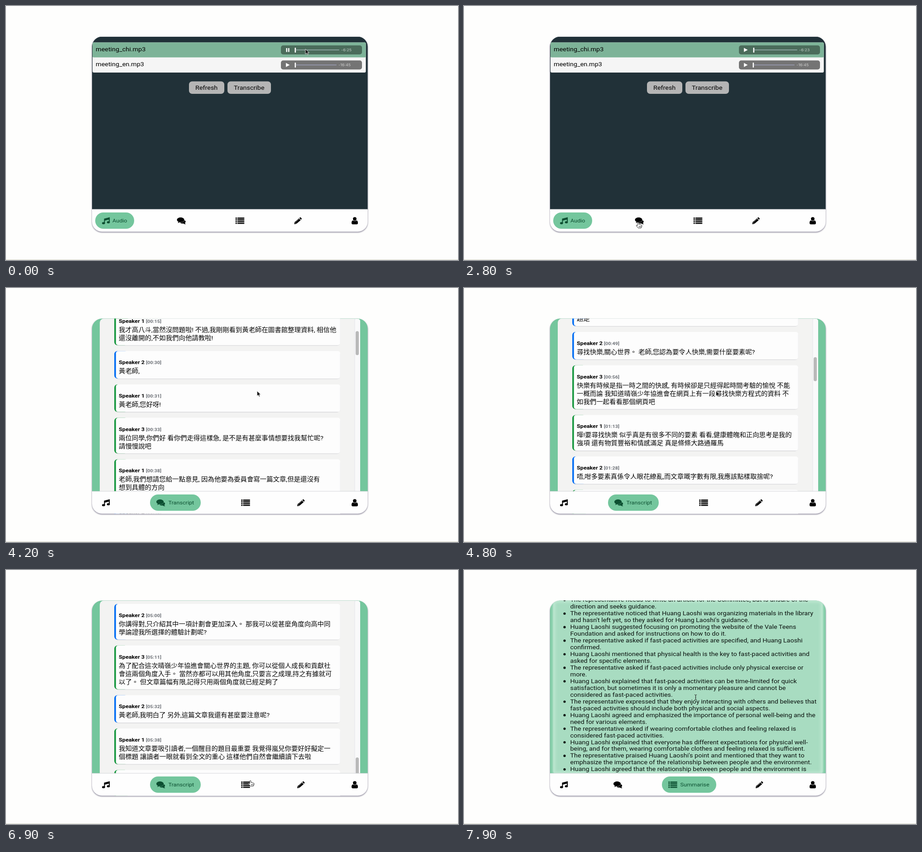
Write an HTML page that moves like this. It is 998 px wide and 561 px high and loops after 8000 ms.

```html
<!DOCTYPE html>
<html lang="zh-Hant">
<head>
<meta charset="utf-8">
<title>Meeting notes</title>
<style>
html, body { margin: 0; height: 100%; overflow: hidden; background: #fefefd; }
svg { display: block; width: 100vw; height: 100vh; }
text { font-family: Roboto, "Noto Sans CJK TC", "Noto Sans CJK", sans-serif; white-space: pre; }
.time { font-family: Inter, sans-serif; fill: #fff; opacity: .65; }
</style>
</head>
<body>
<svg id="stage" viewBox="0 0 998 561"></svg>
<script>
const LOOP = 8000, STEP = 100;
const GREEN = '#74c69d', DEEP = '#0c4f31';

const transcript = `1|00:00|恭喜你當選晴嶺少年協進會的學生代表呀! 身為你的朋友,我也覺得很光榮呀!
2|00:06|柏言,多謝你的祝賀! 但我要為委員會寫一篇文章, 現在還沒有具體方向,你不如/幫我想想呀!
1|00:15|我才高八斗,當然沒問題啦! 不過,我剛剛看到黃老師在圖書館整理資料, 相信他/還沒離開的,不如我們向他請教啦!
2|00:30|黃老師,
1|00:31|黃老師,您好呀!
3|00:33|兩位同學,你們好 看你們走得這樣急, 是不是有甚麼事情想要找我幫忙呢?/請慢慢說吧
1|00:38|老師,我們想請您給一點意見, 因為他要為委員會寫一篇文章,但是還沒有/想到具體的方向
2|00:43|是呀,老師 這篇文章是寫給高中同學看的, 委員會希望我們介紹今年的主題, 主/題是
2|00:49|尋找快樂,關心世界。 老師,您認為要令人快樂,需要什麼要素呢?
3|00:56|快樂有時候是指一時之間的快感, 有時候卻是只經得起時間考驗的愉悅 不能/一概而論 我知道晴嶺少年協進會在網頁上有一段尋找快樂方程式的資料 不/如我們一起看看那個網頁吧
1|01:13|嘩!要尋找快樂 似乎真是有很多不同的要素 看看,健康體魄和正向思考是我的/強項 還有物質豐裕和情感滿足 真是條條大路通羅馬
2|01:28|唔,咁多要素真係令人眼花繚亂,而文章嘅字數有限,我應該點樣取捨呢?
3|01:36|文章的篇幅有限,你可以先選擇兩個要素, 再仔細說明它們和快樂的關係,這/樣讀者就更容易明白
1|01:48|我認為健康體魄最重要! 每天做運動出一身汗, 所有煩惱都會一掃而空,心情/自然會好起來
2|02:00|運動的確可以令人開心, 但是有些同學不太喜歡運動,他們也可以用其他方法/找到快樂
3|02:11|說得對,每個人對快樂都有不同的看法, 所以你要想一想哪些要素最能夠引起/讀者的共鳴
1|02:23|那麼物質豐裕又怎樣呢? 有舒適的衣服和好吃的東西, 我已經覺得非常滿足和/快樂了
3|02:34|物質能夠帶來一時的滿足, 但是這種感覺很快就會消失,未必能夠成為長久的/快樂
2|02:45|這樣說來,正向思考比較適合高中同學, 因為遇到困難的時候,他們可以換一個/角度去想
1|02:54|我同意,不過和朋友相處的時間也很重要, 大家互相支持和鼓勵,比一個人獨處/開心得多
2|03:04|對呀,和家人朋友建立良好的關係, 可以得到情感上的滿足,我想把這一點寫進/文章裏面
3|03:15|嵐兒,您明白到人際互動的重要性, 這的確會令您更容易找到快樂。
2|03:22|多謝黃老師的提點,我知道這篇文章應該選擇的兩個要素了。 而晴領少年協/進會有一系列體驗尋找快樂的活動, 其中兩個活動與我的選擇直接相關。
3|03:36|這樣你可以以相關的活動內容為例, 讓人更容易明白這兩個要素,如何能夠令/人快樂, 這樣就能夠讓你的解說更具體生動了。
1|03:48|好啦,快樂就講到呢度啦,主題裏面仲有另一部份。 藍兒,你唔好淨係顧住自己/快樂,都要關心世界呀。
2|03:58|所謂獨樂樂不如眾樂樂,我當然都希望快樂唔限於個人,
3|04:05|關心世界可以由身邊的小事做起, 例如參加義工服務,探訪長者和幫助有需要/的人
1|04:16|我看到網頁上面有幾個體驗計劃, 有的是到不同地方交流,有的是服務社區, 還/有的是保護環境 每一個計劃都很有意思, 真想全部都參加呀/你會怎樣選擇呢?
2|04:30|我也覺得每一個計劃都很吸引, 不過文章的字數有限,如果全部都介紹的話,就/沒有辦法說得仔細
3|04:40|不如你只選擇其中一項計劃, 把它的目的和內容清楚地介紹給讀者, 再說明參/加者可以得到甚麼收穫, 這樣文章的重點就會更加清晰/也更有說服力
1|04:51|老師說得真有道理! 集中介紹一項計劃, 讀者看完之後就會留下深刻的印象,也/更想參加
2|05:00|你講得對,只介紹其中一項計劃會更加深入。 那我可以從甚麼角度向高中同/學論證我所選擇的體驗計劃呢?
3|05:11|為了配合這次晴嶺少年協進會關心世界的主題, 你可以從個人成長和貢獻社/會這兩個角度入手。 當然亦都可以用其他角度,只要言之成理,持之有據就可/以了。 但文章篇幅有限,記得只用兩個角度就已經足夠了
2|05:32|黃老師,我明白了 另外,這篇文章我還有甚麼要注意呢?
1|05:38|我知道文章要吸引讀者,一個醒目的題目最重要 我覺得嵐兒你要好好擬定一/個標題 讓讀者一眼就看到全文的重心 這樣他們自然會繼續讀下去啦
3|05:50|說得好,題目要簡潔有力`;

const summary = `The student was congratulated by a friend on being elected as the/student representative.
The friend offered to help and proposed asking a teacher for/some useful ideas.
The representative needs to write an article for the Committee, but is unsure of the/direction and seeks guidance.
The representative noticed that Huang Laoshi was organizing materials in the library/and hasn't left yet, so they asked for Huang Laoshi's guidance.
Huang Laoshi suggested focusing on promoting the website of the Vale Teens/Foundation and asked for instructions on how to do it.
The representative asked if fast-paced activities are specified, and Huang Laoshi/confirmed.
Huang Laoshi mentioned that physical health is the key to fast-paced activities and/asked for specific elements.
The representative asked if fast-paced activities include only physical exercise or/more.
Huang Laoshi explained that fast-paced activities can be time-limited for quick/satisfaction, but sometimes it is only a momentary pleasure and cannot be/considered as fast-paced activities.
The representative expressed that they enjoy interacting with others and believes that/fast-paced activities should include both physical and social aspects.
Huang Laoshi agreed and emphasized the importance of personal well-being and the/need for various elements.
The representative asked if wearing comfortable clothes and feeling relaxed is/considered fast-paced activities.
Huang Laoshi explained that everyone has different expectations for physical well-/being, and for them, wearing comfortable clothes and feeling relaxed is sufficient.
The representative praised Huang Laoshi's point and mentioned that they want to/emphasize the importance of the relationship between people and the environment.
Huang Laoshi agreed that the relationship between people and the environment is`;

// The whole window is slightly wider than tall, text included.
const text = (s, x, y, size = 13.1, attrs = '') =>
  `<text transform="translate(${x} ${y}) scale(1.1 1)" font-size="${size}" ${attrs}>${s}</text>`;
const rect = (x, y, w, h, fill, r = 0, attrs = '') =>
  `<rect x="${x}" y="${y}" width="${w}" height="${h}" rx="${r}" fill="${fill}" ${attrs}/>`;
const path = (d, attrs = '') => `<path d="${d}" ${attrs}/>`;

const icons = [
  path('M-4-4.6 8.6-7.7V3.4H6.6V-2.6L-2 -.4V5.6H-4Z') +
    '<ellipse cx="-5.2" cy="5.4" rx="3.3" ry="2.4"/><ellipse cx="5.5" cy="3.4" rx="3.3" ry="2.4"/>',
  path('M3-1.5C9-2 11 2.5 7.5 5Q8 7 9.8 7.8 6.5 8 4.5 6.2 0 6.6-3 4.6Z') +
    path('M-2-7.4C3-7.4 6.2-4.8 6.2-2S3 3.4-2 3.4Q-3 3.4-4 3.2-6 5-8.6 5-7 4-6.7 2.2-10 .8-10-2C-10-4.8-7-7.4-2-7.4Z',
      'stroke="var(--back)" stroke-width="1" paint-order="stroke"'),
  [-7, -3.2, .6, 4.4].map(y => path(`M-9.7 ${y}h3v2.6h-3ZM-5.5 ${y}H9.7v2.6H-5.5Z`)).join(''),
  path('M-8 7.6-7.2 3 2.2-5.2 6.2-1.4-3.2 6.8ZM3.2-6 4.6-7.3Q5.4-8 6.3-7.2L8.1-5.4Q8.8-4.6 8.1-3.8L7-2.3Z') +
    path('M-6.3 3.6-3.6 6M-5 2.2 2.6-4.2', 'stroke="var(--back)" stroke-width=".7"'),
  '<ellipse cy="-4" rx="3.9" ry="4.1"/>' +
    path('M-7 5C-7 1-5.6-.6-3.7-.6-1.6 1 1.6 1 3.7-.6 5.6-.6 7 1 7 5 7 7 6 8 4.5 8H-4.5C-6 8-7 7-7 5Z')
];
const tabs = [
  { label: 'Audio', pill: [197, 86], textX: 235, xs: [220.5, 387.5, 516.5, 644.5, 770] },
  { label: 'Transcript', pill: [318, 112], textX: 358.5, xs: [220.5, 342, 529, 651, 770] },
  { label: 'Summarise', pill: [437, 120], textX: 477.5, xs: [220.5, 340, 461, 652, 770] }
];
const navBar = (tab, active) =>
  rect(190, 449, 609, 50, '#fefefe') + rect(190, 448.6, 609, .8, '#c9cbd0') +
  rect(tab.pill[0], 456, tab.pill[1], 36, GREEN, 18) +
  tab.xs.map((x, i) => `<g transform="translate(${x} 474.3)" fill="${i === active ? DEEP : '#000'}"
    style="--back:${i === active ? GREEN : '#fefefe'}">${icons[i]}</g>`).join('') +
  text(tab.label, tab.textX, 478, 11.5, `fill="${DEEP}"`);

const player = (y, fill, track, trackEnd) =>
  rect(607, y - 10, 179, 20, fill, 5) + rect(640, y - 1, trackEnd - 640, 2, track, 1);
const playIcon = y => path(`M618 ${y - 4.5} 626.5 ${y} 618 ${y + 4.5}Z`, 'fill="#fff"');
const button = (label, x, w) =>
  rect(x, 166.5, w, 27.5, '#b5b5b5', 7) + text(label, x + 14, 184.8);

const audioPage = rect(190, 68, 609, 382, '#213138') +
  rect(191, 80.5, 603.5, 66.5, '#f5f5f5', 3) + rect(191, 80.5, 603.5, 33, '#7db398', 2) +
  text('meeting_chi.mp3', 198, 99.6) + text('meeting_en.mp3', 198, 132.6) +
  player(97, '#4b6c5b', '#87a09b', 736) + player(130.3, '#747474', '#9395a8', 730) +
  `<g id="pause">${rect(618.5, 93, 2.6, 8.5, '#fff')}${rect(623, 93, 2.6, 8.5, '#fff')}</g>
   <g id="play">${playIcon(97)}</g>` + playIcon(130.3) +
  rect(637.5, 92, 2.6, 11, '#fff', 1, 'id="knob"') + rect(637.5, 125, 2.6, 11, '#fff', 1) +
  text('-6:25', 740, 100.2, 8.2, 'class="time" id="clock"') +
  text('-16:45', 734, 133.4, 8.2, 'class="time"') +
  button('Refresh', 404, 78) + button('Transcribe', 489, 96);

const cardTop = {};
let nextTop = 87;
const cards = transcript.split('\n').map(entry => {
  const [who, time, body] = entry.split('|'), lines = body.split('/'), y = nextTop;
  const height = 42.7 + 18 * lines.length;
  cardTop[time] = y;
  nextTop += height + 13;
  return rect(240, y + 1.3, 498, height, '#d9d9dc', 7) +
    rect(239, y, 30, height, who === '2' ? '#0b72f4' : '#1f9a45', 7) +
    rect(242.8, y, 495, height, '#fdfdfd', 5) +
    text(`Speaker ${who} <tspan font-size="9.8" fill="#6c7076">[${time}]</tspan>`, 249, y + 29, 11.5, 'font-weight="700"') +
    lines.map((line, i) => text(line, 249, y + 49 + 18 * i)).join('');
}).join('');
const transcriptPage = rect(190, 67, 609, 383, GREEN) + rect(207, 67.5, 575, 420, '#f3f3f2', 9) +
  `<g id="cards">${cards}</g>` +
  rect(770, 68, 12, 420, '#f9f9fa', 5) + rect(769.5, 68, 1, 382, '#e3e3ea') +
  rect(772, 70, 7, 53, '#b9b9b9', 3.5, 'id="thumb"');

const PITCH = 14.96;
let lineCount = 0;
const bullets = summary.split('\n').map(item => {
  const y = 10.5 + PITCH * lineCount, lines = item.split('/');
  lineCount += lines.length;
  return `<circle cx="222" cy="${y - 4}" r="2.6"/>` +
    lines.map((line, i) => text(line, 234.5, y + PITCH * i)).join('');
}).join('');
const summaryPage = rect(190, 67, 609, 383, GREEN) + rect(197, 67, 595, 383, '#a8dcc1', 5) +
  rect(198, 68, 593, 381, 'none', 5, 'stroke="#c6ecd8" stroke-width="5" filter="url(#soft)"') +
  `<g id="bullets" fill="#0a120e">${bullets}</g>`;

const cursors = {
  arrow: path('M0 0V11.2L2.7 8.8 4.5 12.7 6.4 11.9 4.7 8.1H8.3Z', 'fill="#111" stroke="#fff" stroke-width=".8"'),
  hand: path('M-1.5 1Q0-1 1.5 1V4.8L3 4.4 4.2 5 5.6 4.9 6.6 5.7 8.2 6.2V9L6.6 12.3H0L-4 7.6Q-4.5 6-3 6.2L-1.5 7.5ZM2 8v2.4M4 8v2.4M6 8v2.4',
    'fill="#fff" stroke="#111" stroke-width=".9"'),
  beam: path('M-2.5-5.5Q0-5.5 0-4 0-5.5 2.5-5.5M0-4.5V4.5M-2.5 5.5Q0 5.5 0 4 0 5.5 2.5 5.5M-1 0H1',
    'fill="none" stroke="#222"')
};

const $ = id => document.getElementById(id);
$('stage').innerHTML = `
  <defs>
    <clipPath id="panel">${rect(190, 67.5, 608.5, 431, '#000', 22)}</clipPath>
    <filter id="soft"><feGaussianBlur stdDeviation="3"/></filter>
    <filter id="shade"><feGaussianBlur stdDeviation="1.8"/></filter>
  </defs>
  ${rect(0, 560, 998, 1, '#d6d6c6')}
  ${rect(190, 69, 608.5, 431, '#55506c', 22, 'filter="url(#shade)" opacity=".75"')}
  <g clip-path="url(#panel)">
    ${[audioPage, transcriptPage, summaryPage].map((page, i) => `<g id="page${i}">${page}${navBar(tabs[i], i)}</g>`).join('')}
  </g>
  <g id="cursor">${Object.entries(cursors).map(([kind, art]) => `<g id="${kind}">${art}</g>`).join('')}</g>`;

const linear = u => u, smooth = u => u * u * (3 - 2 * u);
// Keys are [time, ...values].
function follow(keys, t, ease) {
  const next = keys.findIndex(k => k[0] > t);
  if (next === 0) return keys[0].slice(1);
  if (next < 0) return keys[keys.length - 1].slice(1);
  const a = keys[next - 1], b = keys[next], u = ease((t - a[0]) / (b[0] - a[0]));
  return a.slice(1).map((v, i) => v + (b[i + 1] - v) * u);
}
const pointerKeys = [
  [0, 661, 95], [500, 661, 95], [1200, 622, 96], [1700, 622, 96], [2500, 381, 494], [2800, 384.5, 478],
  [3000, 384.5, 478], [3700, 553.5, 227.5], [4000, 553.5, 227.5], [4600, 556.5, 227.5],
  [6400, 556.5, 227.5], [6900, 539.5, 465], [7400, 539.5, 465], [7700, 511.5, 281]
];
const scrollKeys = [
  [3800, 0], [4000, 50], [4800, cardTop['00:49'] - 97],
  [5800, cardTop['03:22'] - 117], [6500, cardTop['05:00'] - 75]
];
const summaryKeys = [[7500, 78], [7900, 0]];

const show = (id, on) => $(id).style.display = on ? '' : 'none';
const shift = (id, x, y) => $(id).setAttribute('transform', `translate(${x} ${y})`);

function draw(t) {
  const page = t < 3000 ? 0 : t < 7200 ? 1 : 2;
  tabs.forEach((_, i) => show('page' + i, i === page));

  const paused = t >= 1500, played = Math.floor(Math.min(t, 1500) / 750);
  show('pause', !paused);
  show('play', paused);
  $('clock').textContent = '-6:' + (25 - played);
  shift('knob', played / 2, 0);

  const [scrolled] = follow(scrollKeys, t, linear);
  shift('cards', 0, -scrolled);
  shift('thumb', 0, scrolled * 344 / scrollKeys[4][1]);
  shift('bullets', 0, follow(summaryKeys, t, smooth)[0]);

  const [x, y] = follow(pointerKeys, t, smooth);
  const shown = y > 449 ? 'hand' : page === 2 ? 'beam' : 'arrow';
  Object.keys(cursors).forEach(kind => show(kind, kind === shown));
  shift('cursor', x, y);
}

const start = performance.now();
function tick() {
  const t = (performance.now() - start) % LOOP;
  draw(Math.floor(t / STEP) * STEP);
  requestAnimationFrame(tick);
}
tick();
</script>
</body>
</html>
```
